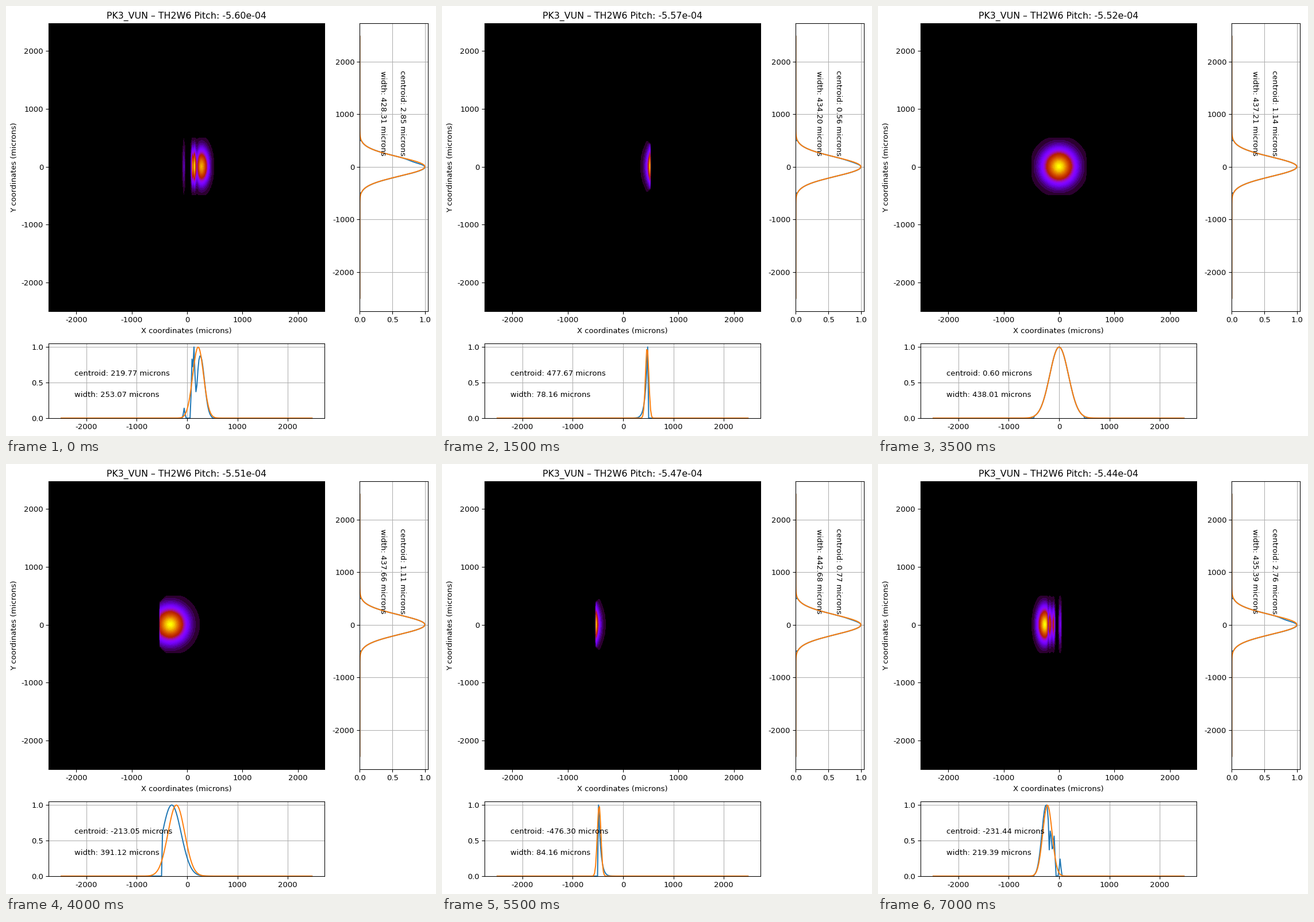
A matplotlib script for the animation above (7.5 s loop, 748 by 748 pixels).

```python
import numpy as np
import matplotlib.pyplot as plt
from matplotlib.animation import FuncAnimation
from matplotlib.ticker import MultipleLocator

SIZE, DPI = 748, 88
FRAMES, MIDDLE = 15, 7
K = 95 / DPI  # scale of the default point sizes

plt.rcParams.update({
    "font.family": "DejaVu Sans",
    "font.size": 10 * K,
    "axes.unicode_minus": False,
    "axes.linewidth": 0.8 * K,
    "axes.labelpad": 4 * K,
    "axes.titlepad": 6 * K,
    "lines.linewidth": 1.5 * K,
    "grid.linewidth": 0.8 * K,
})
for side in ("xtick", "ytick"):
    plt.rcParams.update({
        f"{side}.major.size": 3.5 * K,
        f"{side}.major.width": 0.8 * K,
        f"{side}.major.pad": 3.5 * K,
    })

# Screen grid in microns
N = 256
STEP = 5000 / N
grid = (np.arange(N) - N // 2) * STEP
X, Y = np.meshgrid(grid, grid)
EDGE = 500    # half size of the aperture
SIGMA = 186   # beam size
SHIFT = 305   # beam travel per pitch step

# Readings at the key steps: centroid and width along x, then along y
STOPS = [0, 3, 5, 7, 9, 11, 14]
READINGS = np.array([
    [219.77, 253.07, 2.85, 428.31],
    [477.67, 78.16, 0.56, 434.20],
    [427.09, 342.12, 1.09, 437.67],
    [0.60, 438.01, 1.14, 437.21],
    [-426.69, 344.22, 1.09, 438.11],
    [-476.30, 84.16, 0.77, 442.68],
    [-231.44, 219.39, 2.76, 435.39],
])

# Fringes at both ends of the scan: (height, center, sigma)
BLIP = {1: (.14, -58, 14), -1: (.24, -20, 15)}
LOBES = {
    1: [(.88, 262, 82), (-.18, 188, 20), (.7, 98, 14), (.72, 137, 14)],
    -1: [(1, 258, 84), (-.42, 196, 11), (.4, 98, 14), (.1, 168, 18)],
}


def gauss(x, center, sigma):
    return np.exp(-((x - center) / sigma) ** 2 / 2)


def fit(center, fwhm):
    return gauss(grid, center, fwhm / 2.3548)


def aperture(profile, x):
    profile = np.where(np.abs(x) < EDGE, profile, 0)
    return profile / profile.max()


def x_profile(i):
    """Horizontal profile and the vertical spread of each column."""
    sign = 1 if i < MIDDLE else -1
    u, away = sign * grid, abs(i - MIDDLE)
    if away < 5:
        return aperture(gauss(u, away * SHIFT, SIGMA), u), SIGMA
    # Fringes shrink towards the aperture edge
    v = EDGE - (EDGE - u) * 4 / (away - 3)
    main_part = sum(h * gauss(v, c, s) for h, c, s in LOBES[sign])
    height, center, sigma = BLIP[sign]
    p = np.where(v > 70, main_part, height * gauss(v, center, sigma))
    return aperture(p, u), np.where(v < 40, 235, SIGMA)


def y_profile(i, center, fwhm):
    dent = .07 * max(0, abs(i - MIDDLE) - 2) / 5
    return aperture(fit(center, fwhm) - dent * gauss(grid, 90, 42), grid)


def spot(p, spread):
    z = p * np.exp(-(Y / spread) ** 2 / 2) * (np.abs(Y) < EDGE)
    return z * np.clip((635 - np.hypot(X, Y)) / 20, 0, 1)


fig = plt.figure(figsize=(SIZE / DPI, SIZE / DPI), dpi=DPI, facecolor="white")
cells = fig.add_gridspec(4, 4, left=74.3 / SIZE, right=734.4 / SIZE,
                         bottom=31.1 / SIZE, top=718.1 / SIZE,
                         wspace=.516, hspace=.43)
main = fig.add_subplot(cells[:3, :3])
right = fig.add_subplot(cells[:3, 3])
below = fig.add_subplot(cells[3, :3])

LEVELS = 34
half = .5 / (LEVELS - 1)
span = (grid[0], grid[-1])
image = main.imshow(np.zeros((N, N)), cmap=plt.get_cmap("gnuplot", LEVELS),
                    vmin=-half, vmax=1 + half, origin="lower",
                    extent=span * 2, aspect="auto")
main.set_xlabel("X coordinates (microns)")
main.set_ylabel("Y coordinates (microns)")
title = main.set_title("", fontsize=12 * K)

margin = .05 * (span[1] - span[0])
limits = (span[0] - margin, span[1] + margin)
below.set(xlim=limits, ylim=(0, 1.05))
right.set(xlim=(0, 1.05), ylim=limits)
for axis in (main.xaxis, main.yaxis, below.xaxis, right.yaxis):
    axis.set_major_locator(MultipleLocator(1000))
for axis in (right.xaxis, below.yaxis):
    axis.set_major_locator(MultipleLocator(.5))
for ax in (right, below):
    ax.grid(True)

x_data, = below.plot([], [], "C0")
x_fit, = below.plot([], [], "C1")
y_data, = right.plot([], [], "C0")
y_fit, = right.plot([], [], "C1")

x_center = below.text(-2240, .6, "")
x_width = below.text(-2240, .3, "")
y_center = right.text(.6, 240, "", rotation=-90)
y_width = right.text(.3, 240, "", rotation=-90)


def update(i):
    cx, wx, cy, wy = (np.interp(i, STOPS, column) for column in READINGS.T)
    p, spread = x_profile(i)
    image.set_data(spot(p, spread))
    x_data.set_data(grid, p)
    x_fit.set_data(grid, fit(cx, wx))
    y_data.set_data(y_profile(i, cy, wy), grid)
    y_fit.set_data(fit(cy, wy), grid)
    pitch = -5.60e-4 + 0.16e-4 * i / (FRAMES - 1)
    title.set_text(f"PK3_VUN – TH2W6 Pitch: {pitch:.2e}")
    for label, value in ((x_center, cx), (y_center, cy)):
        label.set_text(f"centroid: {value:.2f} microns")
    for label, value in ((x_width, wx), (y_width, wy)):
        label.set_text(f"width: {value:.2f} microns")
    return image, x_data, x_fit, y_data, y_fit


anim = FuncAnimation(fig, update, frames=FRAMES, interval=500,
                     repeat=True, repeat_delay=0, blit=False)
plt.show()
```
